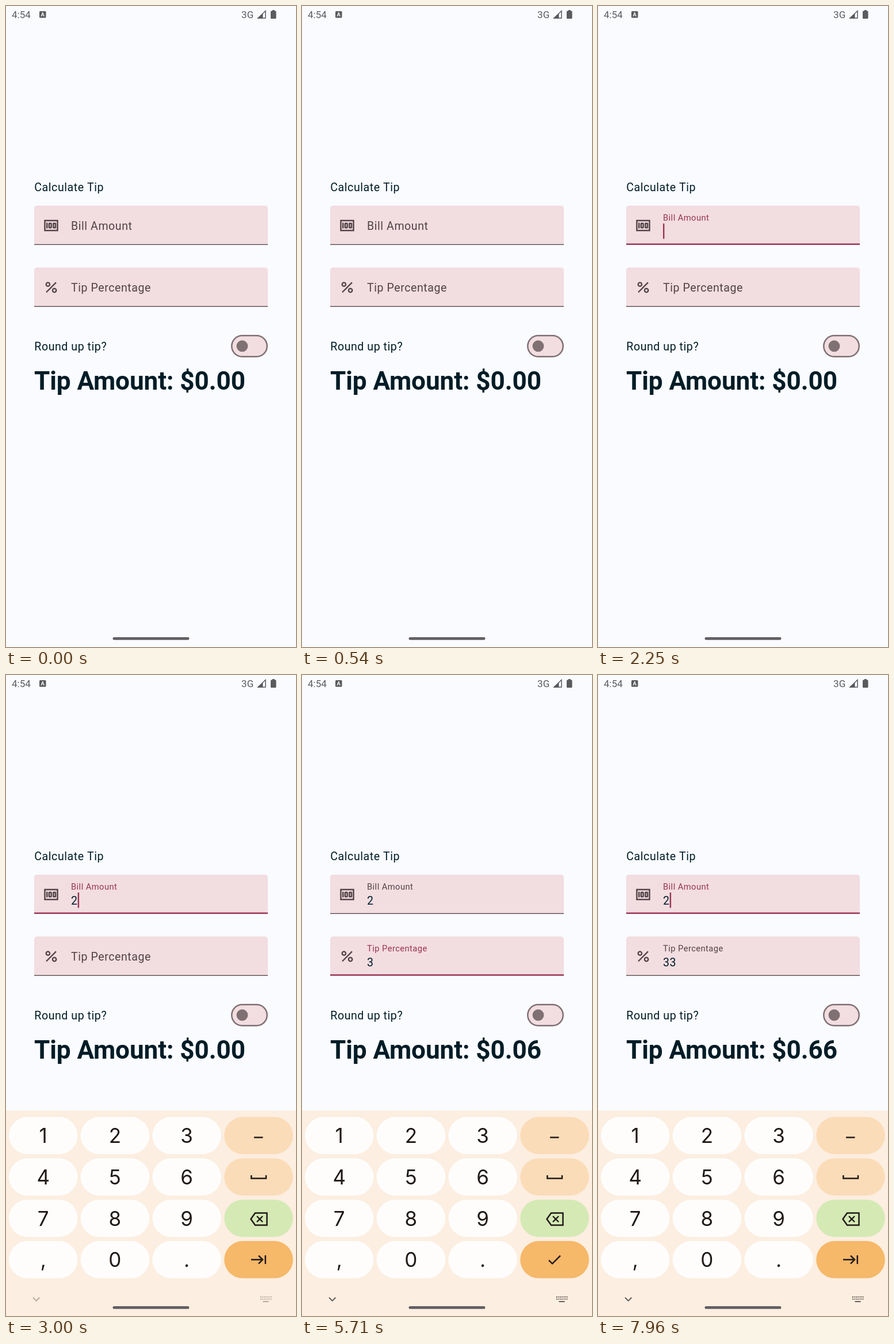
An HTML page with a canvas that plays this animation: 504 px wide and 1111 px high, repeating every 8 s.

```html
<!DOCTYPE html>
<html lang="en">
<head>
<meta charset="utf-8">
<title>Tip calculator</title>
<style>
  html, body { margin: 0; width: 100%; height: 100%; overflow: hidden; background: #f9fbff; }
  canvas { display: block; width: 504px; height: 1111px; }
</style>
</head>
<body>
<canvas id="stage"></canvas>
<script>
const W = 504, H = 1111, LOOP = 8000;
const canvas = document.getElementById('stage');
const ctx = canvas.getContext('2d');
const dpr = window.devicePixelRatio || 1;
canvas.width = W * dpr;
canvas.height = H * dpr;

const PAGE = '#f9fbff', INK = '#001c26', SURFACE = '#f2dde1', OUTLINE = '#7f7074';
const STATUS = '#5a5a5c', KEY_INK = '#201a17', NAV_INK = '#655d59';
const MUTED = [81, 67, 71], ACCENT = [152, 52, 84];
const BODY = 19.6, SMALL = 14.7;

// Timeline in ms
const FOCUS_BILL = 1000, TYPE_BILL = 2540, FOCUS_TIP = 4330;
const TYPE_TIP = [5000, 6210], REFOCUS_BILL = 7850;
const BLINK_STARTS = [FOCUS_BILL, TYPE_BILL, FOCUS_TIP, ...TYPE_TIP, 7500, REFOCUS_BILL];

const lerp = (a, b, p) => a + (b - a) * p;
const progress = (t, start, length) => Math.min(1, Math.max(0, (t - start) / length));
const easeOut = p => 1 - (1 - p) ** 3;
const mix = (a, b, p) => `rgb(${a.map((v, i) => Math.round(lerp(v, b[i], p))).join(',')})`;

function text(str, x, y, size, color, { spacing = 0, weight = 400, align = 'left', family = 'Roboto' } = {}) {
  ctx.font = `${weight} ${size}px ${family}, sans-serif`;
  ctx.letterSpacing = spacing + 'px';
  ctx.textAlign = align;
  ctx.fillStyle = color;
  ctx.fillText(str, x, y);
}

const body = (str, x, y) => text(str, x, y, BODY, INK, { spacing: 0.54 });

function box(x, y, w, h, r, color) {
  ctx.fillStyle = color;
  ctx.beginPath();
  ctx.roundRect(x, y, w, h, r);
  ctx.fill();
}

function disc(x, y, r, color) {
  ctx.fillStyle = color;
  ctx.beginPath();
  ctx.arc(x, y, r, 0, Math.PI * 2);
  ctx.fill();
}

function line(points, color, width, closed = false) {
  ctx.beginPath();
  points.forEach(([x, y]) => ctx.lineTo(x, y));
  if (closed) ctx.closePath();
  ctx.strokeStyle = color;
  ctx.lineWidth = width;
  ctx.stroke();
}

function statusBar() {
  text('4:54', 10, 21, 17, STATUS);
  box(58, 9, 11.5, 11.5, 1.5, STATUS);
  text('A', 63.8, 18.3, 9.5, PAGE, { weight: 700, align: 'center' });
  text('3G', 409, 21, 17, STATUS, { spacing: 0.2 });
  line([[438, 21], [451, 21], [451, 8.5]], STATUS, 1.5, true);
  ctx.fillStyle = STATUS;
  ctx.beginPath();
  [[437, 21.5], [446.5, 21.5], [446.5, 12.5]].forEach(p => ctx.lineTo(...p));
  ctx.fill();
  box(460, 8.5, 9.5, 13.5, 1.3, STATUS);
  box(462.8, 7, 4, 3, 0.5, STATUS);
}

function moneyIcon(y, color) {
  ctx.strokeStyle = color;
  ctx.lineWidth = 2.45;
  ctx.strokeRect(67.5, y - 8.6, 22, 17.2);
  ctx.fillStyle = color;
  ctx.fillRect(70, y - 4.9, 2.45, 9.8);
  for (const x of [74.9, 82.3]) {
    ctx.beginPath();
    ctx.roundRect(x, y - 3.7, 3.7, 7.4, 0.5);
    ctx.stroke();
  }
}

function percentIcon(y, color) {
  line([[70, y + 8.6], [87, y - 8.6]], color, 2.3);
  for (const d of [-1, 1]) {
    ctx.beginPath();
    ctx.arc(78.5 + d * 5.6, y + d * 5.2, 3.2, 0, Math.PI * 2);
    ctx.stroke();
  }
}

// focus and lift both run from 0 to 1
function field(y, label, icon, value, focus, lift, cursor) {
  const height = 68.1, color = mix(MUTED, ACCENT, focus), thick = lerp(1.3, 2.5, focus);
  box(49, y, 406, height, [4.9, 4.9, 0, 0], SURFACE);
  ctx.fillStyle = color;
  ctx.fillRect(49, y + height - thick, 406, thick);
  icon(y + 34.5, mix(MUTED, MUTED, 0));
  text(label, 113, y + lerp(42, 25.5, lift), lerp(BODY, SMALL, lift), color,
    { spacing: lerp(0.54, 0.45, lift) });
  body(value, 113, y + 52);
  if (cursor) {
    ctx.fillStyle = color;
    ctx.fillRect(113 + value.length * 11.7, y + 31, 2.4, 26.5);
  }
}

function toggle() {
  box(391, 570, 64, 39, 19.5, OUTLINE);
  box(393.5, 572.5, 59, 34, 17, SURFACE);
  disc(410.5, 589.4, 9.9, OUTLINE);
}

function enterIcon(x, y, done) {
  if (done) {
    line([[x - 10, y + 1], [x - 4, y + 7], [x + 10, y - 7]], KEY_INK, 2.5);
    return;
  }
  line([[x - 13, y], [x + 6, y]], KEY_INK, 2.5);
  line([[x, y - 7], [x + 7, y], [x, y + 7]], KEY_INK, 2.5);
  line([[x + 11.8, y - 7.5], [x + 11.8, y + 7.5]], KEY_INK, 2.5);
}

function backspaceIcon(x, y) {
  line([[x - 14, y], [x - 6.5, y - 10.5], [x + 14, y - 10.5], [x + 14, y + 10.5], [x - 6.5, y + 10.5]],
    KEY_INK, 2.5, true);
  for (const d of [-1, 1]) line([[x - 3.5, y - 5 * d], [x + 6.5, y + 5 * d]], KEY_INK, 2.4);
}

function keyboard(offset, iconAlpha, done) {
  ctx.save();
  ctx.translate(0, offset);
  ctx.fillStyle = '#fceee0';
  ctx.fillRect(0, 755, W, H - 755);
  const sideColors = ['#fadcb8', '#fadcb8', '#d5e9b5', '#f6b869'];
  ['123', '456', '789', ',0.'].forEach((keys, row) => {
    const y = 766 + row * 71.7;
    [...keys].forEach((key, col) => {
      const x = 5 + col * 124.7;
      box(x, y, 119.5, 64.5, 32.2, '#fefdfc');
      text(key, x + 59.7, y + 45.2, 35, KEY_INK, { align: 'center', family: 'Inter' });
    });
    box(379.3, y, 119.5, 64.5, 32.2, sideColors[row]);
  });
  line([[431, 801.5], [446.5, 801.5]], KEY_INK, 2.5);
  line([[426.3, 867], [426.3, 872.5], [452, 872.5], [452, 867]], KEY_INK, 2.5);
  backspaceIcon(439.5, 943);
  enterIcon(439, 1013.3, done);

  ctx.globalAlpha = iconAlpha;
  line([[47, 1079], [52.7, 1084.7], [58.4, 1079]], NAV_INK, 1.9);
  ctx.fillStyle = NAV_INK;
  for (let row = 0; row < 2; row++)
    for (let col = 0; col < 6; col++) ctx.fillRect(442 + col * 3.5, 1077 + row * 3.7, 2, 2);
  ctx.fillRect(446.5, 1085, 10, 2);
  ctx.restore();
}

function draw(t) {
  ctx.setTransform(dpr, 0, 0, dpr, 0, 0);
  ctx.fillStyle = PAGE;
  ctx.fillRect(0, 0, W, H);
  statusBar();

  const billLift = easeOut(progress(t, FOCUS_BILL, 150));
  const tipLift = easeOut(progress(t, FOCUS_TIP, 150));
  const back = easeOut(progress(t, REFOCUS_BILL, 100));
  const onTip = t >= FOCUS_TIP && t < REFOCUS_BILL;
  const blinkStart = BLINK_STARTS.filter(s => s <= t).pop();
  const cursor = blinkStart !== undefined && (t - blinkStart) % 1000 < 500;
  const bill = t >= TYPE_BILL ? '2' : '';
  const percent = '3'.repeat(TYPE_TIP.filter(s => s <= t).length);

  body('Calculate Tip', 49.3, 321);
  field(346, 'Bill Amount', moneyIcon, bill, billLift - tipLift + back, billLift, cursor && !onTip);
  field(453.2, 'Tip Percentage', percentIcon, percent, tipLift - back, tipLift, cursor && onTip);
  body('Round up tip?', 49.3, 597.3);
  toggle();
  text('Tip Amount: $' + (bill * percent / 100).toFixed(2), 49, 665.3, 44.1, INK,
    { weight: 700, spacing: -0.08 });

  if (t >= TYPE_BILL) {
    const slide = easeOut(progress(t, TYPE_BILL, 285));
    keyboard((1 - slide) * 356, progress(t, 2860, 300), onTip);
  }
  box(185.5, 1094, 133, 4.8, 2.4, '#625e64');
}

const start = performance.now();
function tick() {
  draw((performance.now() - start) % LOOP);
  requestAnimationFrame(tick);
}
tick();
</script>
</body>
</html>
```
